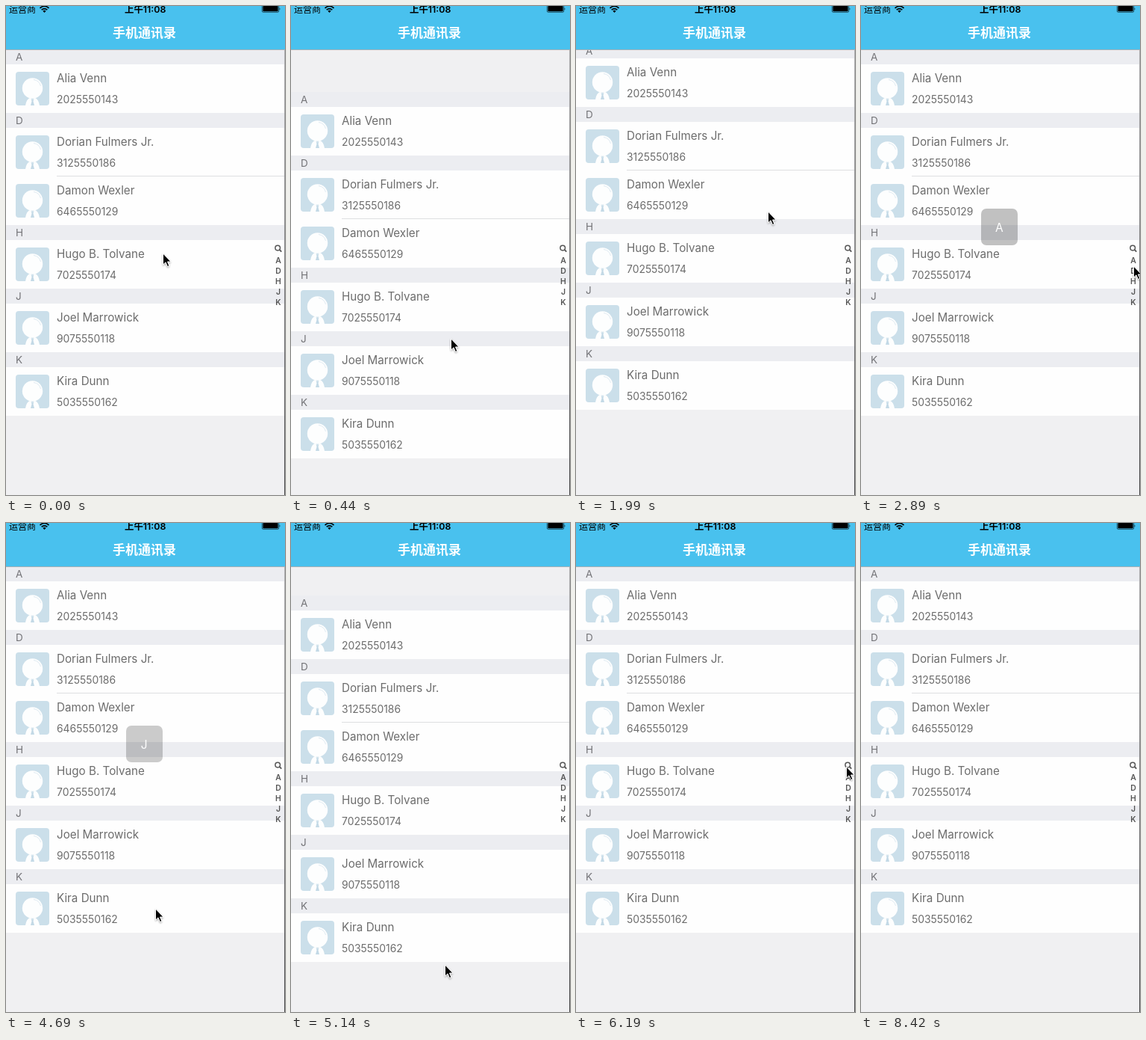
Recreate the animation shown at these times as an HTML page. Size 374x654 px, loop 8490 ms.

```html
<!DOCTYPE html>
<html lang="zh">
<head>
<meta charset="utf-8">
<title>手机通讯录</title>
<style>
  html, body { margin: 0; width: 100%; height: 100%; overflow: hidden; background: #f0f0f2; }
  svg { display: block; width: 374px; height: 654px; }
  text { font-family: Inter, "Noto Sans CJK SC", "Noto Sans CJK", sans-serif; }
  .name { font-size: 15.2px; fill: #6c6c6c; }
  .phone { font-size: 13.9px; fill: #6c6c6c; }
  .section { font-size: 13.5px; fill: #737377; }
  .index { font-size: 10.5px; font-weight: 600; fill: #555; text-anchor: middle; }
</style>
</head>
<body>
<svg viewBox="0 0 374 654">
  <defs>
    <clipPath id="view"><rect y="58" width="374" height="596"/></clipPath>
    <linearGradient id="edge" x2="0" y2="1">
      <stop offset="0" stop-color="#b0b0b2"/>
      <stop offset=".45" stop-color="#858587"/>
      <stop offset="1" stop-color="#4a4a4c"/>
    </linearGradient>
    <filter id="shadow" x="-50%" y="-30%" width="200%" height="180%">
      <feDropShadow dx="0" dy="1.2" stdDeviation="1" flood-opacity=".35"/>
    </filter>
    <g id="avatar">
      <rect width="45" height="45" rx="4" fill="#cbdfea"/>
      <path d="M13 45Q14.500 36 20 34.500L22.500 38L25 34.500Q30.500 36 32 45Z" fill="#fdfefe"/>
      <path d="M20.500 36L22.500 38L24.500 36L23.500 39.500L25 45H20L21.500 39.500Z" fill="#c3d9e6"/>
      <circle cx="22.500" cy="22" r="13.700" fill="#fdfefe"/>
      <path d="M24 10.500A11.500 11.500 0 0 1 33.500 19" fill="none" stroke="#dbe8f0" stroke-width=".9"/>
    </g>
  </defs>
  <rect width="374" height="654" fill="#f0f0f2"/>
  <g clip-path="url(#view)"><g id="list"></g></g>
  <g id="index">
    <circle cx="364.200" cy="323.600" r="3.300" fill="none" stroke="#555" stroke-width="1.500"/>
    <path d="M366.600 326L369.300 328.700" stroke="#555" stroke-width="1.800"/>
  </g>
  <rect width="374" height="58" fill="#49c1ee"/>
  <rect y="58" width="374" height="1" fill="#a5b1b7"/>
  <text x="4" y="9" font-size="12">运营商</text>
  <g fill="none" stroke="#000" stroke-width="1.700">
    <path d="M45.500 2.800Q51.500 -2.400 57.500 2.800M47.700 5.200Q51.500 1.900 55.300 5.200"/>
    <path d="M49.300 6.500Q51.500 4.800 53.700 6.500L51.500 9Z" fill="#000" stroke="none"/>
  </g>
  <text x="186.700" y="9" font-size="12.400" font-weight="600" text-anchor="middle">上午11:08</text>
  <rect x="343.300" y="-1" width="22.400" height="9.300" rx="1.500" fill="none" stroke="#000" stroke-width=".6"/>
  <rect x="344.400" y="0" width="20.200" height="7.200" rx=".7"/>
  <path d="M366.600 2.200Q368.400 4 366.600 5.600Z"/>
  <text x="185.500" y="42" font-size="17" font-weight="700" fill="#fff" text-anchor="middle">手机通讯录</text>
  <rect x="373" y="59" width="1" height="595" fill="url(#edge)"/>
  <g id="popup">
    <rect x="161" y="271" width="49" height="49" rx="7" fill="#000" fill-opacity=".24"/>
    <text id="letter" x="185.300" y="301.500" font-size="15.500" fill="#fff" text-anchor="middle"></text>
  </g>
  <path id="cursor" d="M0 0V15L3.500 11.800L6 17.500L8.400 16.500L6 11H10.600Z" stroke="#fff" stroke-width="1" filter="url(#shadow)"/>
</svg>
<script>
const LOOP = 8490, STEP = 150;
const VIEW_H = 596, INDEX_Y = 340, INDEX_GAP = 14;
const $ = id => document.getElementById(id);
const clamp = (v, lo = 0, hi = 1) => Math.min(hi, Math.max(lo, v));
const smooth = p => p * p * (3 - 2 * p);

function add(parent, tag, attrs, text) {
  const el = document.createElementNS('http://www.w3.org/2000/svg', tag);
  for (const key in attrs) el.setAttribute(key, attrs[key]);
  if (text) el.textContent = text;
  parent.appendChild(el);
}

const contacts = {
  A: [['Alia Venn', '2025550143']],
  D: [['Dorian Fulmers Jr.', '3125550186'], ['Damon Wexler', '6465550129']],
  H: [['Hugo B. Tolvane', '7025550174']],
  J: [['Joel Marrowick', '9075550118']],
  K: [['Kira Dunn', '5035550162']]
};
const letters = Object.keys(contacts);

function buildList() {
  const list = $('list');
  let y = 58;
  letters.forEach((letter, s) => {
    add(list, 'rect', { y, width: 374, height: 20, fill: '#ecedf1' });
    add(list, 'text', { x: 13, y: y + 15, class: 'section' }, letter);
    add($('index'), 'text', { x: 365, y: INDEX_Y + 4 + INDEX_GAP * s, class: 'index' }, letter);
    y += 20;
    contacts[letter].forEach(([name, phone], i) => {
      add(list, 'rect', { y, width: 374, height: 65, fill: '#fefefe' });
      if (i) add(list, 'rect', { x: 68, y: y - 1, width: 306, height: 1, fill: '#dedfe1' });
      add(list, 'use', { href: '#avatar', x: 13, y: y + 10 });
      add(list, 'text', { x: 68, y: y + 24, class: 'name' }, name);
      add(list, 'text', { x: 68, y: y + 52, class: 'phone' }, phone);
      y += 65;
    });
  });
}

// The screen refreshes every STEP, counted anew from each of these times
const bursts = [0, 140, 1060, 1600, 2740, 3790, 4840, 5890, 6480, 7530];

function snap(time) {
  const start = bursts.findLast(b => b <= time + .01);
  return start + STEP * Math.min(6, Math.floor((time - start + .01) / STEP));
}

// Pointer moves: start, end, x, y
const moves = [
  [0, 740, 216, 509], [1050, 1060, 220, 252], [1560, 2590, 365, 341],
  [2740, 3490, 364, 406], [3640, 3790, 365, 390], [3790, 4690, 200, 516],
  [4690, 5140, 206, 591], [5140, 5440, 255, 400], [5440, 5590, 332, 333],
  [5590, 6190, 362, 326], [6350, 6480, 363, 338], [6480, 7230, 365, 387],
  [7380, 8120, 400, 480]
];

function pointerAt(t) {
  let x = 210, y = 331;
  for (const [start, end, toX, toY] of moves) {
    const p = smooth(clamp((t - start) / (end - start)));
    x += (toX - x) * p;
    y += (toY - y) * p;
  }
  return [x, y];
}

// The list follows a drag with rubber-band resistance, then settles back
const drags = [
  { from: 0, to: 1060, grabY: 331 },
  { from: 1060, to: 1560, grabY: 402 },
  { from: 4690, to: 5440, grabY: 516 }
];

function scrollAt(t) {
  const { to, grabY } = drags.findLast(d => d.from <= t);
  const pull = pointerAt(Math.min(t, to))[1] - grabY;
  const stretch = Math.sign(pull) * VIEW_H * (1 - 1 / (Math.abs(pull) * .55 / VIEW_H + 1));
  return stretch * Math.exp(-Math.max(0, t - to) / 150);
}

// Touching the index shows the letter under the pointer
const scrubs = [
  { from: 2740, to: 3790, fade: 4620 },
  { from: 6480, to: 7380, fade: 7680 }
];

function popupAt(t) {
  const scrub = scrubs.findLast(s => s.from <= t);
  if (!scrub) return ['', 0];
  const y = pointerAt(Math.min(t, scrub.to))[1];
  const row = clamp(Math.floor((y - INDEX_Y) / INDEX_GAP), 0, letters.length - 1);
  return [letters[row], 1 - clamp((t - scrub.fade) / 450)];
}

function draw(time) {
  const t = snap(time % LOOP);
  const [x, y] = pointerAt(t).map(Math.round);
  const [letter, opacity] = popupAt(t);
  $('cursor').setAttribute('transform', `translate(${x + .5} ${y})`);
  $('list').setAttribute('transform', `translate(0 ${Math.round(scrollAt(t))})`);
  $('popup').setAttribute('opacity', opacity);
  $('letter').textContent = letter;
}

buildList();
let start;
function loop(now) {
  start ??= now;
  draw(now - start);
  requestAnimationFrame(loop);
}
draw(0);
requestAnimationFrame(loop);
</script>
</body>
</html>
```
